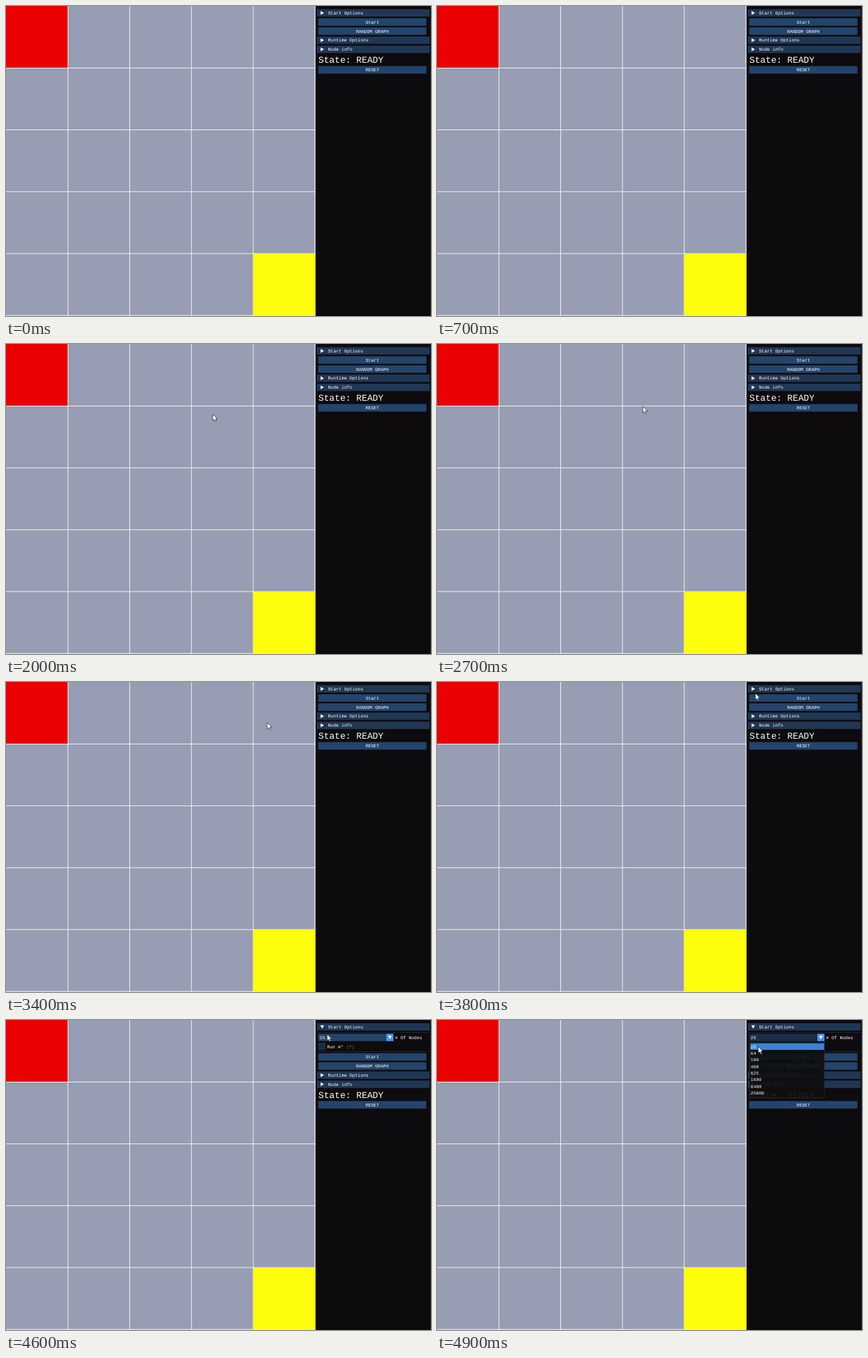
These frames come from a looping animation (600x437 px, 5000 ms). An HTML page with a canvas:

```html
<!DOCTYPE html>
<html>
<head>
<meta charset="utf-8">
<style>
html, body { margin: 0; width: 600px; height: 437px; overflow: hidden; background: #0d0b0e; }
canvas { display: block; }
</style>
</head>
<body>
<canvas id="stage" width="600" height="437"></canvas>
<script>
const ctx = document.getElementById('stage').getContext('2d');
const LOOP = 5000, STEP = 100;
const SHOW_AT = 1000, OPEN_AT = 4100, POPUP_AT = 4700;
const HEADER = '#203754', BUTTON = '#24446b', FRAME = '#1b2e48', HOT = '#3d82d5', BRIGHT = '#4a92ee';
const SIZES = [5, 8, 10, 20, 25, 40, 80, 160].map(n => n * n);
const ARROW = new Path2D('M0 0V9.2L2.1 7.3 3.5 10.4 5 9.7 3.7 6.7 6.5 6.6Z');

// pointer stops: time, x, y
const path = [
  [1400, 142.7, 63.5], [1800, 279.5, 95.3], [2000, 292, 99], [2400, 291.6, 88],
  [3200, 289, 87.5], [3600, 448.5, 27], [3900, 449.7, 12], [4300, 449.8, 12],
  [4600, 453.3, 20], [4900, 453.5, 37.5]
];

function pointer(t) {
  const i = path.findIndex(p => p[0] >= t);
  if (i <= 0) return path[0].slice(1);
  const [t0, x0, y0] = path[i - 1], [t1, x1, y1] = path[i];
  const k = (t - t0) / (t1 - t0), ease = k * k * (3 - 2 * k);
  return [x0 + (x1 - x0) * ease, y0 + (y1 - y0) * ease];
}

function rect(x, y, w, h, color) {
  ctx.fillStyle = color;
  ctx.fillRect(x, y, w, h);
}

// text is placed by its vertical middle
function text(s, x, mid, { size = 6.38, align = 'left', color = '#fff' } = {}) {
  ctx.font = size + 'px "Liberation Mono", monospace';
  ctx.textRendering = 'geometricPrecision';
  ctx.textAlign = align;
  ctx.fillStyle = color;
  ctx.fillText(s, x, mid + size * 0.335);
}

function triangle(x, y, turn) {
  ctx.save();
  ctx.translate(x, y);
  ctx.rotate(turn);
  ctx.fillStyle = '#fff';
  ctx.fill(new Path2D('M-2.2 -2.7L2.6 0 -2.2 2.7Z'));
  ctx.restore();
}

const downArrow = (x, y) => triangle(x, y, Math.PI / 2);
const rightArrow = (x, y) => triangle(x, y, 0);

function header(label, mid, open, hot) {
  rect(439, mid - 5.2, 159, 10.4, hot ? HOT : HEADER);
  (open ? downArrow : rightArrow)(446.4, mid);
  text(label, 454.5, mid + 0.1);
}

function button(label, mid, hot) {
  rect(440.7, mid - 5.3, 152.8, 10.6, hot ? BRIGHT : BUTTON);
  text(label, 517.2, mid, { align: 'center' });
}

function grid() {
  rect(0, 0, 437, 437, '#979db2');
  for (let i = 1; i <= 5; i++) {
    const p = i * 87.2 - 0.3;
    rect(p, 0, 1, 437, '#f0f1f5');
    rect(0, p, 437, 1, '#f0f1f5');
  }
  rect(0, 0, 87, 87, '#eb0000');
  rect(349, 349, 88, 88, '#fdfd0c');
}

function startOptions(hot, popup) {
  rect(439, 17, 159, 0.6, '#303036');
  rect(440.7, 19.3, 96.3, 10.5, hot ? BUTTON : FRAME);
  rect(537, 19.3, 10, 10.5, hot || popup ? BRIGHT : '#2a4f7e');
  downArrow(542, 24.5);
  text('25', 442.8, 24.7);
  text('# Of Nodes', 549.3, 24.7);
  rect(440.7, 32, 10.4, 10.4, FRAME);
  text('Run A*', 453.2, 37.4);
  text('(?)', 480.4, 37.4, { color: '#7c7c7e' });
  rect(439, 44.2, 159, 0.6, '#303036');
}

function popupList(y) {
  rect(441, 31, 106, 79.2, 'rgba(15,15,16,.93)');
  ctx.strokeStyle = '#34343b';
  ctx.lineWidth = 0.6;
  ctx.strokeRect(441.2, 31.2, 105.7, 78.8);
  rect(442.3, 32.8, 104.4, 9.3, y > 32.8 ? HOT : HEADER);
  SIZES.forEach((n, i) => text(n, 442.8, 37.6 + i * 9.35));
}

function cursor(x, y) {
  ctx.save();
  ctx.translate(x, y);
  ctx.fillStyle = '#fff';
  ctx.fill(ARROW);
  ctx.strokeStyle = '#22242a';
  ctx.lineWidth = 0.7;
  ctx.stroke(ARROW);
  ctx.restore();
}

function draw(t) {
  const open = t >= OPEN_AT, popup = t >= POPUP_AT;
  const [x, y] = pointer(t);
  const over = mid => x >= 441 && Math.abs(y - mid) < 5.3;
  const shift = open ? 29.5 : 0;
  const row = i => 9.7 + i * 12.85 + shift;

  rect(0, 0, 600, 437, '#0d0b0e');
  grid();
  rect(599, 0, 1, 437, '#25272a');

  header('Start Options', 9.7, open, over(9.7));
  if (open) startOptions(!popup && over(24.5), popup);
  button('Start', row(1), !open && over(row(1)));
  button('RANDOM GRAPH', row(2));
  header('Runtime Options', row(3));
  header('Node info', row(4));
  text('State: READY', 441, 75.9 + shift, { size: 12.78 });
  button('RESET', 90 + shift);
  if (popup) popupList(y);
  if (t >= SHOW_AT) cursor(x, y);
}

const begin = performance.now();
function tick() {
  const t = (performance.now() - begin) % LOOP;
  draw(Math.floor(t / STEP) * STEP);
  requestAnimationFrame(tick);
}
tick();
</script>
</body>
</html>
```
